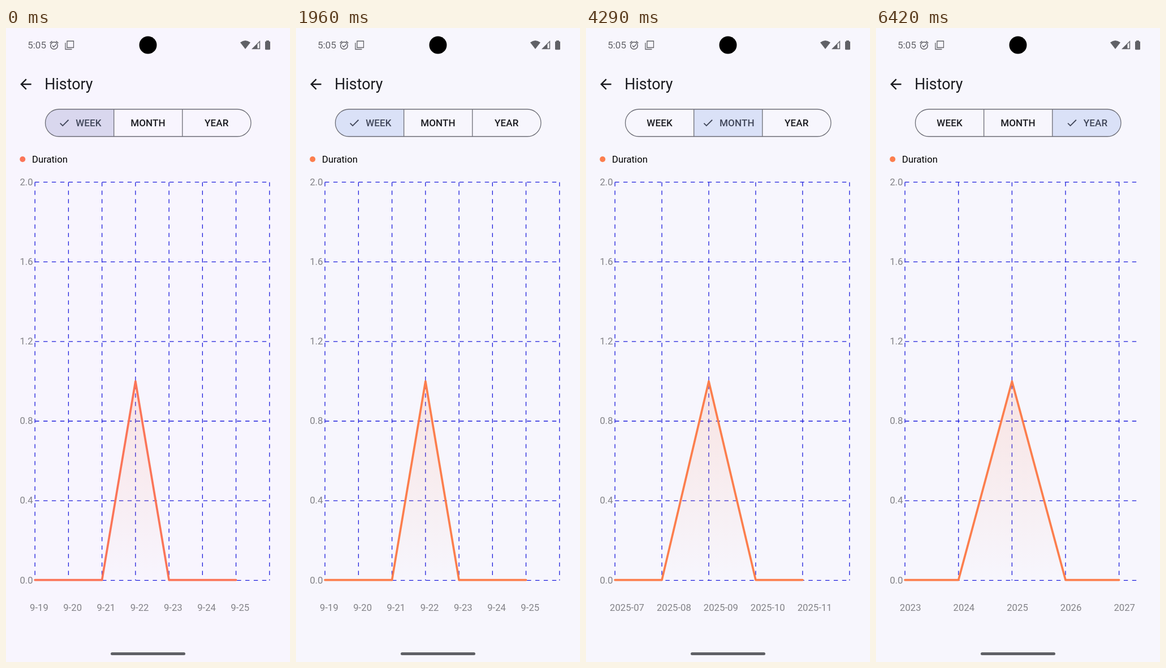
Recreate the animation shown at these times as an HTML page. Size 502 by 1116 pixels, loop 6.46 s.

```html
<!DOCTYPE html>
<html lang="en">
<head>
<meta charset="utf-8">
<title>History chart</title>
<style>
  html, body { margin: 0; width: 100%; height: 100%; overflow: hidden; background: #f7f6fd; }
  svg { display: block; width: 502px; height: 1116px; font: 16.73px Roboto, sans-serif; }
  .tab { font-size: 17.08px; font-weight: 500; letter-spacing: .12px; text-anchor: middle; fill: #1a1b20; }
  .axis { fill: #828287; }
  .grid { stroke: #1c1cdc; stroke-width: 1.3; stroke-dasharray: 7.436; fill: none; }
</style>
</head>
<body>
<svg viewBox="0 0 502 1116">
  <defs>
    <linearGradient id="area" x1="0" y1="622" x2="0" y2="972" gradientUnits="userSpaceOnUse">
      <stop offset="0" stop-color="#ff7f50" stop-opacity=".16"/>
      <stop offset="1" stop-color="#ff7f50" stop-opacity="0"/>
    </linearGradient>
    <clipPath id="pill"><rect x="69.5" y="143" width="363.5" height="48" rx="24"/></clipPath>
  </defs>
  <rect id="page" width="502" height="1116"/>

  <g fill="#606166">
    <text x="38.2" y="36" font-size="17">5:05</text>
    <g fill="none" stroke="#606166" stroke-width="1.5">
      <circle cx="85" cy="31" r="6.3"/>
      <path d="M77.5 26.5l4-3.3M92.5 26.5l-4-3.3M82 31l2.4 2.4 4.4-4.6"/>
      <path d="M108 23h11.5v11.5H108zM105 26v11.5h11.5" stroke-width="1.3"/>
    </g>
    <path d="M414 25.5Q423 18.5 432 25.5L423 37z"/>
    <path d="M449.2 22v15.2H434z"/>
    <path d="M444.5 28.5l3.2-3.2v10.4h-3.2z" fill="#f7f6fd"/>
    <path d="M460 22h5v1.8h2V37q0 1.2-1.2 1.2h-6.6q-1.2 0-1.2-1.2V23.8h2z"/>
    <rect x="185" y="1099" width="132" height="5" rx="2.5"/>
  </g>
  <circle cx="251" cy="30" r="15.5"/>

  <path transform="translate(20.3 84.4) scale(1.22)" fill="#1a1b20"
    d="M20 11H7.83l5.59-5.59L12 4l-8 8 8 8 1.41-1.41L7.83 13H20z"/>
  <text x="68.2" y="108" font-size="26.84" fill="#1a1b20">History</text>

  <g id="tabs"></g>
  <g fill="none" stroke="#6d6e77" stroke-width="1.3">
    <rect x="69.5" y="143" width="363.5" height="48" rx="24"/>
    <path d="M190.7 143v48M311.8 143v48"/>
  </g>

  <circle class="accent" cx="29.3" cy="231" r="5"/>
  <text x="46" y="237">Duration</text>
  <g id="chart"></g>
</svg>

<script>
const LOOP = 6460;
const LEFT = 51.2, RIGHT = 465.8, TOP = 271.4, BOTTOM = 972.4;
const TAB_WIDTH = 121.2, TAB_SHIFT = 15.85;
const $ = id => document.getElementById(id);

const tabs = [
  { name: 'WEEK', width: 44.5, on: -1000, off: 2500 },
  { name: 'MONTH', width: 61, on: 2500, off: 4990 },
  { name: 'YEAR', width: 42, on: 4990, off: 1e5 }
];
const charts = [
  { until: 2720, step: (RIGHT - LEFT) / 7, peak: 3,
    labels: Array.from({ length: 7 }, (_, i) => '9-' + (19 + i)) },
  { until: 5210, step: (RIGHT - LEFT) / 5, peak: 2,
    labels: ['07', '08', '09', '10', '11'].map(m => '2025-' + m) },
  { until: LOOP, step: 94.6, peak: 2,
    labels: Array.from({ length: 5 }, (_, i) => 2023 + i) }
];

const clamp = v => Math.min(1, Math.max(0, v));
const ramp = (t, start, length) => clamp((t - start) / length);
const mix = (a, b, p) => `rgb(${a.map((v, i) => v + (b[i] - v) * p)})`;

// Cubic bezier (.4, 0, .2, 1), solved by bisection
function ease(x) {
  let lo = 0, hi = 1;
  for (let i = 0; i < 20; i++) {
    const s = (lo + hi) / 2, r = 1 - s;
    if (1.2 * r * r * s + .6 * r * s * s + s ** 3 < x) lo = s; else hi = s;
  }
  return lo * lo * (3 - 2 * lo);
}

function drawTab({ name, width, on, off }, i, t, fill) {
  const selected = t >= on && t < off;
  const enter = ease(ramp(t, on, 205));
  const shift = TAB_SHIFT * (t < off ? enter : 1 - ease(ramp(t, off, 350)));
  const x = 69.5 + TAB_WIDTH * i, middle = x + TAB_WIDTH / 2 + (i ? -.3 : 0);
  const press = ramp(t, on - 80, 100) * (1 - ramp(t, on + 220, 150));
  const box = (color, opacity) => `<rect x="${x}" y="143" width="${TAB_WIDTH + .2}" height="48"
    fill="${color}" opacity="${opacity}" clip-path="url(#pill)"/>`;
  const iconX = middle + TAB_SHIFT - width / 2 - 31.7;
  const check = `<path transform="translate(${iconX} ${178 - 22 * enter}) scale(${.913 * enter})"
    opacity="${enter}" fill="#404659" d="M9 16.17L4.83 12l-1.42 1.41L9 19 21 7l-1.41-1.41z"/>`;
  return (selected ? box(fill, 1) : '') + box('#404659', press * .11) + (selected ? check : '') +
    `<text class="tab" x="${middle + shift}" y="173"
      ${selected ? 'style="fill:#404659"' : ''}>${name}</text>`;
}

function drawChart({ step, peak, labels }) {
  const xs = labels.map((_, i) => LEFT + step * i);
  const end = LEFT + step * labels.length;
  const verticals = end < RIGHT + 1 ? [...xs, end] : xs;
  const rowY = i => TOP + (BOTTOM - TOP) * i / 5;
  const points = xs.map((x, i) => `${x},${i === peak ? (TOP + BOTTOM) / 2 : BOTTOM - .8}`);
  let grid = verticals.map(x => `M${x} ${TOP}V${BOTTOM}`).join('');
  let text = labels.map((s, i) => `<text class="axis" x="${xs[i] - 9.2}" y="1025.5">${s}</text>`).join('');
  for (let i = 0; i < 6; i++) {
    grid += `M${LEFT} ${rowY(i)}H${RIGHT}`;
    text += `<text class="axis" x="24.4" y="${rowY(i) + 5.1}">${(2 - .4 * i).toFixed(1)}</text>`;
  }
  return `<path class="grid" d="${grid}"/>${text}
    <polygon points="${points.slice(peak - 1, peak + 2).join(' ')}" fill="url(#area)"/>
    <polyline class="accent" points="${points.join(' ')}" style="fill:none" stroke-width="3.7"
      stroke-linejoin="round" stroke-linecap="round"/>`;
}

let shown;
function render(now) {
  const t = now % LOOP;
  const settle = ramp(t, 330, 300);
  const selectedFill = mix([217, 215, 238], [218, 225, 247], settle);
  const accent = mix([251, 117, 88], [252, 126, 77], settle);
  const chart = charts.find(c => t < c.until);

  if (chart !== shown) $('chart').innerHTML = drawChart(shown = chart);
  $('tabs').innerHTML = tabs.map((tab, i) => drawTab(tab, i, t, selectedFill)).join('');
  $('page').setAttribute('fill', mix([248, 245, 254], [247, 246, 253], settle));
  for (const el of document.querySelectorAll('.accent')) {
    el.setAttribute(el.tagName === 'circle' ? 'fill' : 'stroke', accent);
  }
  requestAnimationFrame(render);
}
requestAnimationFrame(render);
</script>
</body>
</html>
```
